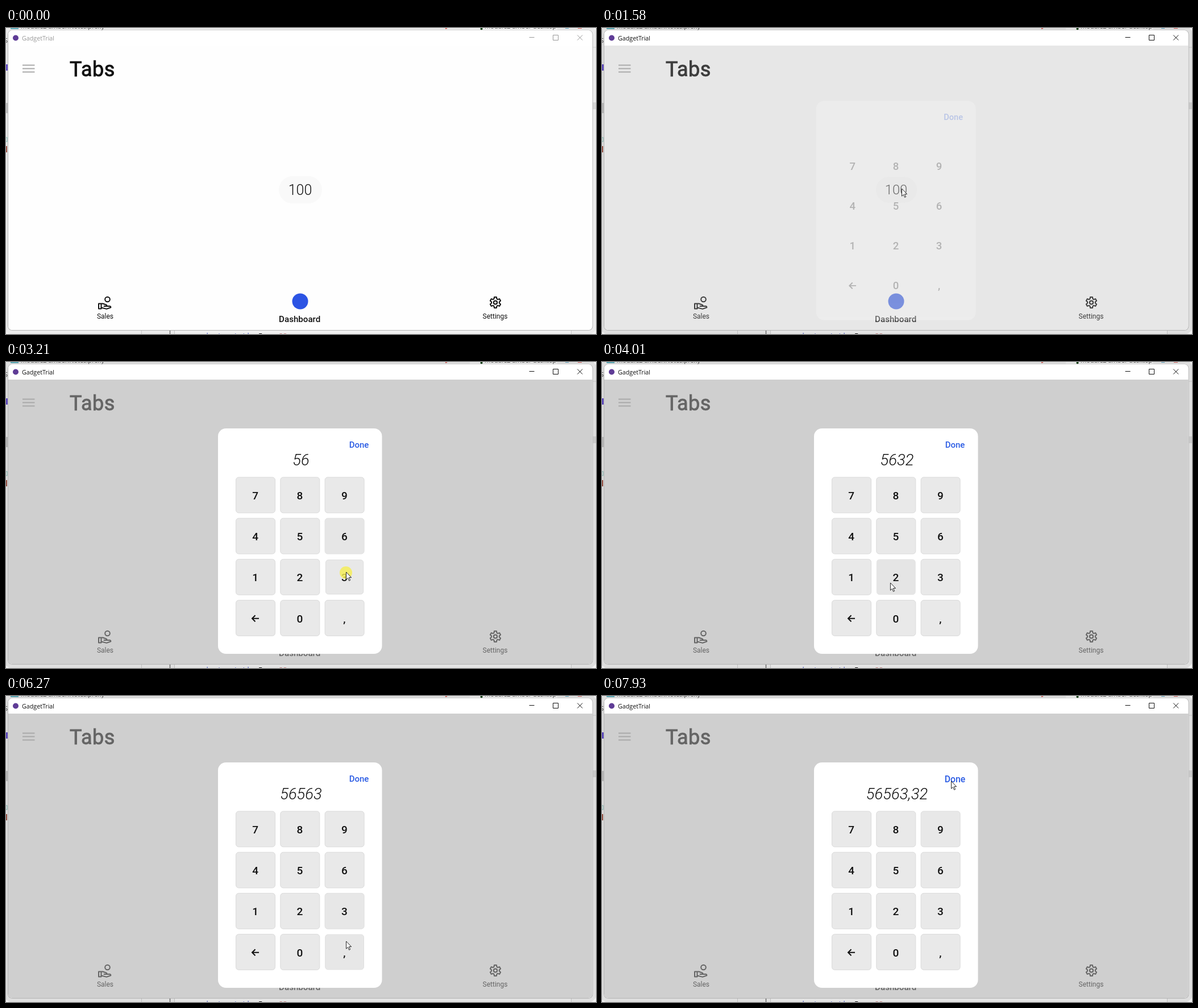
Animation of 1038x539 px, one loop 8 s. Source, as an HTML page:

```html
<!DOCTYPE html>
<html lang="en">
<head>
<meta charset="utf-8">
<title>Number pad</title>
<style>
  html, body { margin: 0; width: 100%; height: 100%; overflow: hidden; background: #f5f5f5; }
  svg { display: block; width: 1038px; height: 539px; }
  text { font-family: Roboto, sans-serif; fill: #111; }
  .mid { text-anchor: middle; }
  .bold { font-weight: 500; }
  .light { font-weight: 300; }
  .head { font-size: 36px; letter-spacing: .5px; stroke: #111; stroke-width: .9; }
  .icon { fill: none; stroke: #111; stroke-width: 2; stroke-linejoin: round; stroke-linecap: round; }
  .code { font: 12px "Noto Sans Mono", monospace; }
  .tab { font: 11px "Open Sans", sans-serif; fill: #444; }
</style>
</head>
<body>
<svg id="stage" viewBox="0 0 1038 539">
  <defs>
    <clipPath id="frame"><rect x="4" y="4" width="1027.5" height="528" rx="7"/></clipPath>
  </defs>

  <!-- editor behind the window -->
  <rect width="1038" height="539" fill="#f5f5f5"/>
  <rect x="816" width="154" height="5" fill="#fff"/>
  <rect x="8" width="14" height="2" fill="#62b5c4"/>
  <text class="tab" x="26" y="1">module2 amber.Notes.proxy</text>
  <circle cx="836.500" cy="1.500" r="2" fill="#174a1c"/>
  <text class="tab" x="842" y="1">module2 amber desktop</text>
  <path d="M773 1l3-1M1006 0h7" stroke="#e0605a" stroke-width="2"/>
  <path d="M984 0h6" stroke="#58a8c8" stroke-width="2"/>
  <text class="tab" x="-3" y="26">S</text>
  <rect y="64" width="3" height="11" fill="#6650d0"/>
  <rect y="132" width="4" height="18" fill="#c9c9c9"/>
  <rect x="-6" y="193" width="8" height="7" fill="none" stroke="#86c5bb"/>
  <rect y="208" width="2" height="11" fill="#a4584a"/>
  <path d="M1031 34h7" stroke="#d8d8d8"/>
  <rect x="1031" y="131" width="7" height="12" fill="#dedede"/>
  <rect x="296" y="531" width="698" height="8" fill="#fafafa"/>
  <path d="M238.500 531v8M296.500 531v8M994.500 531v8" stroke="#d0d0d0"/>
  <path d="M288.500 531v8" stroke="#777" stroke-width="1.500"/>
  <text class="code" x="336" y="547"><tspan fill="#2438c8">private static</tspan> Form <tspan fill="#b03434">""</tspan>;</text>

  <!-- window -->
  <rect id="shadow" x="3.500" y="4" width="1028.500" height="528.500" rx="7.500" fill="none" stroke="#000" stroke-width="14"/>
  <rect x="3.500" y="4" width="1028.500" height="528.500" rx="7.500" fill="#fff" stroke="#b4b4b4" stroke-width="1.200"/>
  <g clip-path="url(#frame)">
    <rect x="4" y="4" width="1028" height="27" fill="#fff"/>
    <rect x="4" y="31" width="1028" height="502" fill="#fefefe"/>
    <circle cx="17" cy="17.500" r="5" fill="#5f3c96"/>
    <text id="title" x="28" y="22" style="font:10.700px 'Open Sans',sans-serif">GadgetTrial</text>
    <path id="controls" d="M920.500 16.500h9M962.500 12.500h9v9h-9zM1005.200 12.500l9 9M1014.200 12.500l-9 9" fill="none"/>

    <path d="M29 65.500h21.500M29 71.500h21.500M29 77.500h21.500" stroke="#aaa" stroke-width="2"/>
    <text class="head" x="112" y="85">Tabs</text>

    <g id="pill">
      <rect x="480" y="261" width="76" height="48" rx="24" fill="#f9f9f9"/>
      <text class="mid light" x="517.500" y="293.600" font-size="25">100</text>
    </g>

    <g class="icon">
      <circle cx="178.500" cy="478" r="4.300"/>
      <path d="M163 485.500h4.500v9h-4.500zM167.500 485.500h3l6 2.200q1.500 .8 .5 2.300h-4.500M177 490h5.200q2.400 .2 2.100 2.300l-7.300 2.600l-9.500 -2.400"/>
      <path id="gear"/>
      <circle cx="861" cy="483.500" r="3.100"/>
    </g>
    <circle cx="517.500" cy="481.500" r="14" fill="#2c54e4"/>
    <text class="mid" x="174.500" y="512" font-size="12">Sales</text>
    <text class="mid bold" x="516.700" y="518" font-size="15.100">Dashboard</text>
    <text class="mid" x="860.500" y="512" font-size="12">Settings</text>

    <rect id="shade" x="4" y="31" width="1028" height="502" fill="#aaa"/>
  </g>

  <g id="card">
    <rect x="373" y="117" width="288.500" height="397" rx="14" fill="#fff"/>
    <text id="done" class="mid bold" x="621" y="151.300" font-size="15" style="fill:#2a5be4">Done</text>
    <text id="value" class="mid light" x="519" y="181.700" font-size="27.400" font-style="italic"></text>
    <g id="keys"></g>
  </g>

  <circle id="spot" r="11" fill="#f5ee50" opacity=".8"/>
  <path id="cursor" d="M.5 0v13.200l3-2.800 2.100 4.900 2-.9-2.100-4.800h4.100z" fill="#fff" stroke="#111" stroke-width=".9"/>
</svg>

<script>
const LOOP = 8000;
const PRESS = 120;
const $ = id => document.getElementById(id);
const clamp = v => Math.max(0, Math.min(1, v));
const span = (t, a, b) => clamp((t - a) / (b - a));
const ease = p => p * p * (3 - 2 * p);
const start = performance.now();

// cursor moves: from time, to time, x, y
const home = [742, 545];
const moves = [
  [520, 1120, 527, 283],
  [2490, 2780, 600, 300],
  [3070, 3180, 598, 370],
  [3400, 3650, 520, 374],
  [3880, 4350, 451, 453],
  [5060, 5220, 518, 300],
  [5390, 5500, 598, 302],
  [5740, 5860, 598, 372],
  [6060, 6190, 598, 432],
  [6600, 6720, 598, 374],
  [6920, 7080, 519, 374],
  [7470, 7860, 614, 150]
];

// key presses: time, key
const presses = [
  [2320, "5"], [2840, "6"], [3190, "3"], [3680, "2"],
  [4500, "←"], [4840, "←"], [5240, "5"], [5500, "6"],
  [5880, "3"], [6380, ","], [6740, "3"], [7110, "2"]
];
const PILL_PRESS = 1130;

function cursorAt(t) {
  let [x, y] = home;
  for (const [a, b, nx, ny] of moves) {
    const p = ease(span(t, a, b));
    x += (nx - x) * p;
    y += (ny - y) * p;
  }
  return [x, y];
}

function valueAt(t) {
  return presses.reduce((s, [at, k]) =>
    t < at + PRESS ? s : k === "←" ? s.slice(0, -1) : s + k, "");
}

function inside(t, b) {
  if (t < 2290) return 0;
  const [x, y] = cursorAt(t);
  return +(x > b.x && x < b.x + b.w && y > b.y && y < b.y + b.h);
}

// hover level, averaged over the last few moments so that it fades
function hover(t, box, time) {
  let sum = 0;
  for (let i = 0; i < 6; i++) sum += inside(t - time * i / 5, box);
  return sum / 6;
}

const pulse = (t, at) => Math.sin(Math.PI * span(t, at - 30, at + PRESS + 30));

function scaleAt(el, s, x, y, dy = 0) {
  el.setAttribute("transform", `translate(${x} ${y + dy}) scale(${s}) translate(${-x} ${-y})`);
}

function add(parent, tag, attrs, text) {
  const el = document.createElementNS("http://www.w3.org/2000/svg", tag);
  for (const k in attrs) el.setAttribute(k, attrs[k]);
  if (text) el.textContent = text;
  parent.append(el);
  return el;
}

const keys = [..."789456123←0,"].map((label, i) => {
  const x = 404.5 + i % 3 * 78.3, y = 203 + Math.floor(i / 3) * 72.2;
  const w = 69, h = 62.8, cx = x + w / 2, cy = y + h / 2;
  const g = add($("keys"), "g", {});
  const rect = add(g, "rect", { x, y, width: w, height: h, rx: 5 });
  if (label === "←") {
    add(g, "path", { class: "icon", d: `M${cx + 6} ${cy + .7}h-12m5.500 -5.500l-5.500 5.500l5.500 5.500`, style: "stroke-linecap:butt;stroke-linejoin:miter" });
  } else {
    add(g, "text", { class: "mid bold", x: cx - .3, y: cy + 7.5, "font-size": 19 }, label);
  }
  return { label, x, y, w, h, cx, cy, rect };
});
const doneBox = { x: 598, y: 134, w: 46, h: 26 };

function gearPath() {
  const pts = [];
  for (let i = 0; i < 6; i++) {
    for (const [off, r] of [[-21, 6.9], [-12, 9.6], [12, 9.6], [21, 6.9]]) {
      const a = (i * 60 + off - 90) * Math.PI / 180;
      pts.push((861 + r * Math.cos(a)).toFixed(2) + " " + (483.5 + r * Math.sin(a)).toFixed(2));
    }
  }
  return "M" + pts.join("L") + "Z";
}
$("gear").setAttribute("d", gearPath());

function drawKey(k, t, open) {
  const tint = hover(t, k, 250), over = hover(t, k, 70);
  const press = presses.reduce((m, [at, key]) => key === k.label ? Math.max(m, pulse(t, at)) : m, 0);
  const fill = 233 - 4 * tint, edge = 218 + 10 * tint;
  scaleAt(k.rect, 1 - .017 * over - .028 * press, k.cx, k.cy);
  k.rect.setAttribute("fill", `rgb(${fill},${fill},${fill})`);
  k.rect.setAttribute("stroke", `rgb(${edge},${edge},${edge})`);
  k.rect.setAttribute("opacity", Math.pow(open, 4));
}

function render(t) {
  const [x, y] = cursorAt(t);
  const open = span(t, 1440, 1710);
  const active = t >= PILL_PRESS;

  $("title").style.fill = active ? "#111" : "#999";
  $("controls").setAttribute("stroke", active ? "#111" : "#999");
  $("shadow").setAttribute("opacity", active ? .09 : .04);

  scaleAt($("pill"), 1 - .05 * span(t, 1080, 1180), 518, 285);
  $("shade").setAttribute("opacity", .55 * open);

  $("card").setAttribute("opacity", Math.pow(open, 2.2));
  scaleAt($("card"), 1 - .058 * (1 - open), 517, 315.5, 12.5 * (1 - open));
  $("value").textContent = valueAt(t);
  scaleAt($("done"), 1 + .05 * hover(t, doneBox, 60), 621, 146);
  keys.forEach(k => drawKey(k, t, open));

  const down = [PILL_PRESS, ...presses.map(p => p[0])].some(at => t >= at && t < at + PRESS);
  $("spot").setAttribute("visibility", down ? "visible" : "hidden");
  $("spot").setAttribute("cx", x);
  $("spot").setAttribute("cy", y + 1);
  $("cursor").setAttribute("visibility", t >= 520 ? "visible" : "hidden");
  $("cursor").setAttribute("transform", `translate(${x} ${y})`);
}

function tick() {
  render((performance.now() - start) % LOOP);
  requestAnimationFrame(tick);
}
tick();
</script>
</body>
</html>
```
